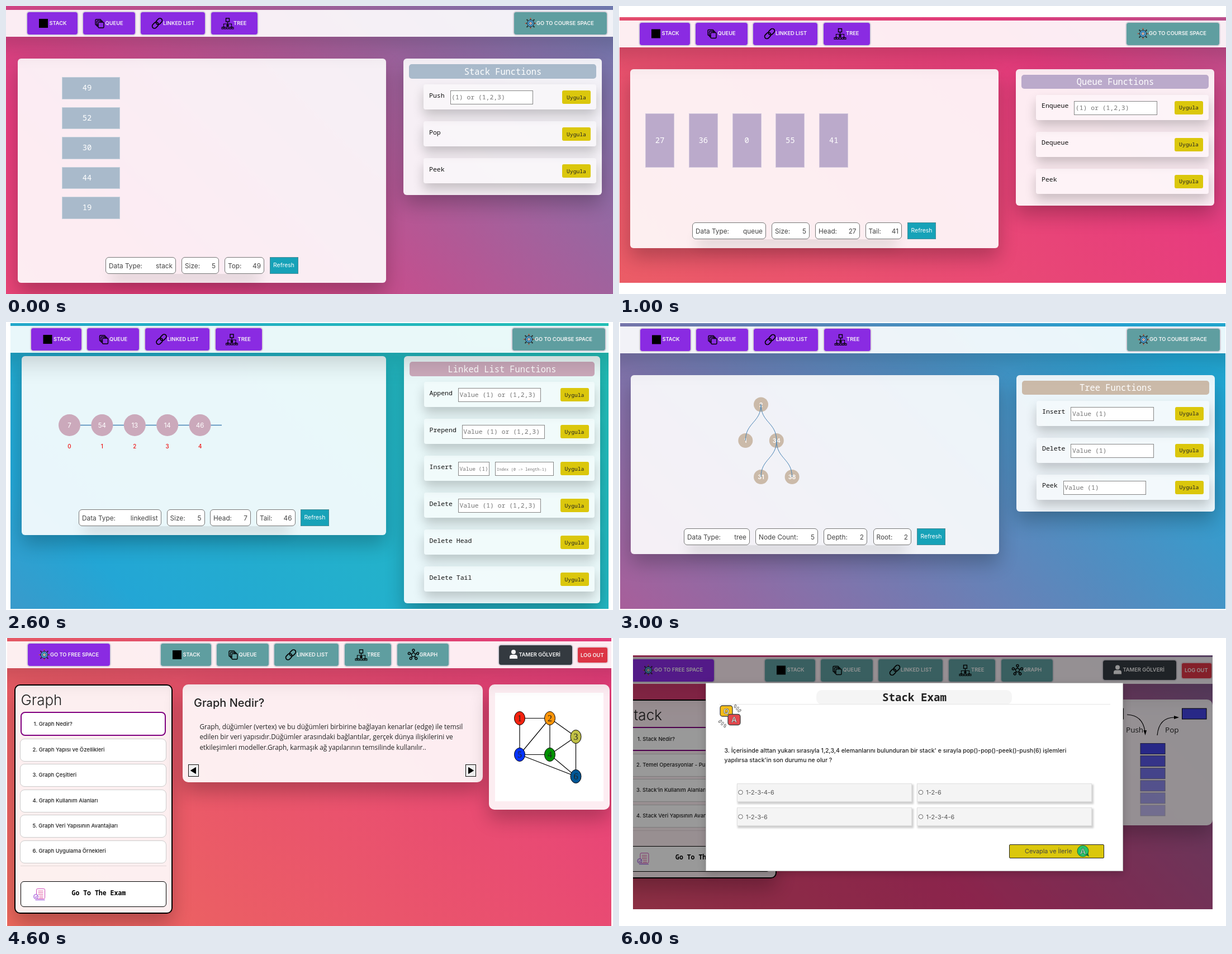
These frames come from a looping animation (1086 by 515 pixels, 7 s). An HTML page:

```html
<!DOCTYPE html>
<html lang="tr">
<head>
<meta charset="utf-8">
<title>Data structures tour</title>
<style>
html, body { margin: 0; width: 100%; height: 100%; overflow: hidden; background: #fff; }
#stage { position: relative; width: 1086px; height: 515px; overflow: hidden; }
.scene { position: absolute; inset: 0; visibility: hidden; }
.scene div { position: absolute; box-sizing: border-box; }
.page { overflow: hidden; }
svg { position: absolute; left: 0; top: 0; width: 1086px; height: 515px; overflow: visible; fill: #222; font-family: Inter, sans-serif; }
text { white-space: pre; }
.m { font-family: 'Noto Sans Mono', monospace; }
.o { font-family: 'Open Sans', sans-serif; }
.s { font-family: 'Liberation Serif', serif; }
.c { text-anchor: middle; }
.e { text-anchor: end; }
.b { font-weight: 600; }
.n { font-weight: 500; }
.l { font-weight: 300; }
</style>
</head>
<body>
<div id="stage"></div>
<script>
const VIOLET = '#8a2be2', TEAL = '#5f9ea0', YELLOW = '#dbc70c', GLASS = 'rgba(255,255,255,.9)';
const SHADOW = 'box-shadow:0 17px 34px rgba(0,0,0,.24);';
const NAV_SHADOW = 'box-shadow:0 17px 40px rgba(0,0,0,.17);';
const ROW_SHADOW = 'box-shadow:0 11px 20px rgba(0,0,0,.2);';

const round = r => `border-radius:${r}px;`;
const edge = (w, color) => `border:${w}px solid ${color};`;
const svg = s => `<svg>${s}</svg>`;
const each = (list, fn) => list.map(fn).join('');
const box = (x, y, w, h, fill, css = '') =>
  `<div style="left:${x}px;top:${y}px;width:${w}px;height:${h}px;background:${fill};${css}"></div>`;
const text = (x, y, s, size, cls = '', fill = '#222', more = '') =>
  svg(`<text x="${x}" y="${y}" font-size="${size}" class="${cls}" fill="${fill}" ${more}>${s}</text>`);
const path = (d, stroke = '#000', w = 1, fill = 'none') =>
  `<path d="${d}" stroke="${stroke}" stroke-width="${w}" fill="${fill}"/>`;
const rect = (x, y, w, h, fill, more = '') =>
  `<rect x="${x}" y="${y}" width="${w}" height="${h}" fill="${fill}" ${more}/>`;
const dot = (x, y, r, fill, more = '') => `<circle cx="${x}" cy="${y}" r="${r}" fill="${fill}" ${more}/>`;
const at = (x, y, s, more = '') => svg(`<g transform="translate(${x} ${y}) ${more}">${s}</g>`);

const page = (x, y, w, h, drift, body) =>
  `<div class="page" style="left:${x}px;top:${y}px;width:${w}px;height:${h}px;` +
  `background:linear-gradient(45deg,#ee7752,#e73c7e,#23a6d5,#23d5ab) ${drift}/400% 400%">` +
  `<div style="left:${-x}px;top:${-y}px">${body}</div></div>`;

// Icons, drawn around 0,0
const spokes = (n, fn) => each([...Array(n).keys()], i => `<g transform="rotate(${i * 360 / n})">${fn(i)}</g>`);
const outline = 'stroke="#000" stroke-width="1.4"';
const icons = {
  stack: rect(-8, -8, 16, 16, '#000'),
  queue: each([-7, -4.5, -2], p => rect(p, p, 10, 10, p < -2 ? 'none' : 'var(--tone)', outline + ' rx="1.5"')),
  link: `<g transform="rotate(-45)">${each([-11, -1.5], x => rect(x, -4, 12.5, 8, 'none', 'rx="4" stroke="#000" stroke-width="1.7"'))}</g>`,
  tree: rect(-3, -9, 6, 6, 'none', outline) + path('M0 -3V1M-7 4V1H7V4M0 1V4M-9 8L-7 5L-5 8M5 8L7 5L9 8', '#000', 1.2) +
    each([-9, -4.5, 0, 4.5, 9], x => rect(x - 1.5, 7, 3, 3, 'none', 'stroke="#000"')) + rect(-2, 2, 4, 4, '#000'),
  graph: dot(0, 0, 3.4, 'none', outline) + spokes(5, () => path('M0 -3.4V-6', '#000', 1.3) + dot(0, -8, 2, 'none', outline)),
  core: spokes(8, i => path('M0 -5V-8.5', '#222', 1.2) + dot(0, -8.8, 1.1, i % 2 ? '#222' : '#c4563c')) +
    dot(0, 0, 6, '#4aa5dc', 'stroke="#222"') + dot(0, 0, 3, '#bfe4f5', 'stroke="#234"') + dot(0, 0, 1.2, '#d8643c'),
  user: dot(0, -4, 4, '#f5f5f5') + path('M-7 8V5Q-7 1 -3 1H3Q7 1 7 5V8Z', 'none', 0, '#f5f5f5'),
  exam: rect(-5, -10, 15, 18, 'none', 'rx="2" stroke="#cf45b4"') + path('M-2 -6H7M-2 -3H7M-2 0H7M0 3H7M0 6H7', '#e0559c') +
    dot(-6, 4, 4, '#fbe9f8', 'stroke="#9148d8"') + path('M-8 4L-6 6L-3 2M-7 10H10', '#9148d8')
};

const star = (x, y, r) => {
  const pts = [...Array(10).keys()].map(i => {
    const a = i * Math.PI / 5 - 1.35, q = i % 2 ? r * .52 : r;
    return `${(q * Math.cos(a)).toFixed(1)} ${(q * Math.sin(a)).toFixed(1)}`;
  });
  return at(x, y, `<polygon points="${pts}" fill="#000" stroke="#000" stroke-linejoin="round"/>`);
};

// Navigation bar
const label = (x, y, s) => text(x, y + 26.6, s, 9.3, 'b', '#f5f5f5');
const navButton = (x, y, w, icon, name, color) =>
  box(x, y + 2, w, 44, color, round(6) + edge(2, '#d8d3dc')) +
  `<span style="--tone:${color}">${at(x + 31.5, y + 24, icons[icon])}</span>` + label(x + 42, y, name);
const bar = y => box(-30, y, 1146, 48, GLASS, NAV_SHADOW);
const links = [[0, 94, 'stack', 'STACK'], [100, 97, 'queue', 'QUEUE'], [203.5, 119, 'link', 'LINKED LIST'],
  [329.5, 87, 'tree', 'TREE'], [423, 96, 'graph', 'GRAPH']];

const freeNav = (dx, y, courseX) => bar(y) +
  each(links.slice(0, 4), ([x, w, icon, name]) => navButton(x + 35.5 + dx, y, w, icon, name, VIOLET)) +
  navButton(courseX, y, 170, 'core', 'GO TO COURSE SPACE', TEAL);

const courseNav = (dx, y, hover) => bar(y) +
  navButton(38 + dx, y, 151, 'core', 'GO TO FREE SPACE', VIOLET).replace(/^<div.*?<\/div>/, d => hover
    ? box(39, y + 4, 144, 40, '#ea6650', round(4) + edge(4, VIOLET) + 'box-shadow:inset 0 -3px 3px #a33c32;') : d) +
  each(links, ([x, w, icon, name]) => navButton(x + 275.5 + dx, y, w, icon, name, TEAL)) +
  box(880.5 + dx, y + 4.5, 135, 39, '#343a40', round(6) + edge(2, '#d8d3dc')) +
  at(909 + dx, y + 23, icons.user) + label(918.5 + dx, y, 'TAMER GÖLVERİ') +
  box(1022 + dx, y + 9, 57, 31, '#dc3545', round(5) + edge(2, '#e8d3dc')) + label(1029 + dx, y + 1, 'LOG OUT');

// Free space widgets
const glass = (x, y, w, h, r = 6, css = '') => box(x, y, w, h, GLASS, round(r) + SHADOW + css);

const status = (y, pills, refreshX) =>
  box(pills[0][0], y, refreshX - pills[0][0] - 10, 30, 'none', 'box-shadow:0 19px 24px -9px rgba(0,0,0,.2);') +
  each(pills, ([x, w, name, value]) => box(x, y, w, 30, '#fff', round(6) + edge(1, '#777')) +
    text(x + 6, y + 19.5, name + ':', 11.8, '', '#444') + text(x + w - 6, y + 19.5, value, 11.8, 'e', '#444')) +
  box(refreshX, y, 51, 30, '#17a2b8', 'border:1px dotted #777;') + text(refreshX + 25.5, y + 18, 'Refresh', 10.4, 'c', '#fff');

const field = (x, y, w, hint, size) =>
  box(x, y, w, 25, '#fff', edge(1, '#858585')) + text(x + 2.5, y + 16, hint, size, 'm', '#757575');

const functions = (x, y, w, h, title, color, rows) => glass(x, y, w, h) +
  box(x + 10, y + 10, w - 20, 25.5, color, round(5)) + text(x + w / 2 + .5, y + 28.5, title, 15.4, 'm c', '#fff') +
  each(rows, ([name, ...fields], i) => {
    const top = y + 46 + i * 66;
    let fx = x + 56 + name.length * 6.9;
    return box(x + 36, top, w - 46, 45, 'rgba(255,255,255,.35)', round(4) + ROW_SHADOW) +
      text(x + 46, top + 23.5, name, 11.5, 'm', '#111') +
      each(fields, ([hint, width = 148.5, size = 11.4]) => {
        const s = field(fx, top + 11, width, hint, size);
        fx += width + 10;
        return s;
      }) +
      box(x + w - 71, top + 11, 51, 24, YELLOW, round(3)) + text(x + w - 45.5, top + 26.5, 'Uygula', 9.7, 'm c');
  });

const block = (x, y, w, h, color, value, tx) =>
  box(x, y, w, h, color, edge(1, 'rgba(255,255,255,.35)')) + text(tx, y + h / 2 + 4.5, value, 13.8, 'm c', '#fff');

const LIST = '(1) or (1,2,3)', VALUES = 'Value ' + LIST, VALUE = 'Value (1)';

const stackScene = page(0, 0, 1086, 515, '32% 50%',
  glass(21, 94, 659, 401) +
  each([49, 52, 30, 44, 19], (v, i) => block(99.5, 127 + i * 53.5, 104, 39.5, '#a9bacb', v, 145)) +
  status(449, [[178, 126, 'Data Type', 'stack'], [314, 67, 'Size', 5], [391, 71, 'Top', 49]], 471.5) +
  functions(711, 94, 355, 244, 'Stack Functions', '#a9bacb', [['Push', [LIST]], ['Pop'], ['Peek']]) +
  freeNav(0, 7, 907));

const queueScene = page(1, 20, 1084.5, 475, '7% 50%',
  glass(20, 112.5, 659, 320.5) +
  each([27, 36, 0, 55, 41], (v, i) => block(47 + i * 77.8, 191.5, 52, 97.5, '#bbaacb', v, 73 + i * 77.8)) +
  status(387, [[131, 132, 'Data Type', 'queue'], [273, 68, 'Size', 5], [351, 79.5, 'Head', 27], [440.5, 65.5, 'Tail', 41]], 516) +
  functions(710, 112.5, 355, 244, 'Queue Functions', '#bbaacb', [['Enqueue', [LIST]], ['Dequeue'], ['Peek']]) +
  freeNav(-1, 25.5, 906));

const linkedScene = page(8, 2, 1070, 511, '100% 50%',
  glass(28, 61, 652, 320) +
  svg(path('M113.5 184.5H386', 'steelblue', 1.5)) +
  each([7, 54, 13, 14, 46], (v, i) => {
    const x = 113.5 + i * 58.4;
    return svg(dot(x, 184.5, 19.5, '#cba9bb')) + text(x, 188.7, v, 11.5, 'c', '#fff') + text(x, 226, i, 9.8, 'c n', '#e11');
  }) +
  status(335, [[130, 147.5, 'Data Type', 'linkedlist'], [287.5, 68, 'Size', 5], [365, 73, 'Head', 7], [448, 69.5, 'Tail', 46]], 527) +
  functions(711.5, 61, 351, 441.5, 'Linked List Functions', '#cba9bb', [['Append', [VALUES]], ['Prepend', [VALUES]],
    ['Insert', [VALUE, 56.5, 9.5], ['Index (0 -> length-1)', 104.5, 7.1]], ['Delete', [VALUES]], ['Delete Head'], ['Delete Tail']]) +
  freeNav(7.5, 7, 904));

const nodes = [[254, 147.5, 2], [226.3, 212, 1], [281.8, 212, 34], [254, 277, 31], [309.6, 277, 38]];
const branch = ([a, b]) => {
  const [x1, y1] = nodes[a], [x2, y2] = nodes[b], mid = (y1 + y2) / 2;
  return path(`M${x1} ${y1}C${x1} ${mid} ${x2} ${mid} ${x2} ${y2}`, 'steelblue');
};
const treeScene = page(2, 2, 1083, 511, '63% 50%',
  glass(21, 94.5, 659, 320.5) +
  each(nodes, ([x, y, v]) => svg(dot(x, y, 13, '#cbbaa9')) + text(x, y + 4, v, 10.8, 'c b', '#fff')) +
  svg(each([[0, 1], [0, 2], [2, 3], [2, 4]], branch)) +
  status(369, [[116, 118, 'Data Type', 'tree'], [244, 112, 'Node Count', 5], [366, 78, 'Depth', 2], [454.5, 68.5, 'Root', 2]], 533) +
  functions(711, 94.5, 354.5, 244, 'Tree Functions', '#cbbaa9', [['Insert', [VALUE]], ['Delete', [VALUE]], ['Peek', [VALUE]]]) +
  freeNav(0, 7.5, 907));

// Course space widgets
const topics = (dx, dy, title, items) => {
  const end = dy + 135 + items.length * 45.4;
  return glass(15 + dx, 82.5 + dy, 283.5, end + 86 - 82.5 - dy, 10, edge(2, '#000')) +
    text(27 + dx, 119.5 + dy, title, 26, 'l') +
    each(items, (name, i) => {
      const y = 134 + dy + i * 45.4, s = `${i + 1}. ${name}`;
      return i
        ? box(25 + dx, y + .5, 262, 41, '#fff', round(8) + edge(1, '#ccc')) + text(48 + dx, y + 23.3, s, 9.5, 'n')
        : box(26 + dx, 131.5 + dy, 260.5, 43, '#fff', round(8) + edge(2.5, 'purple')) + text(50 + dx, 156.5 + dy, s, 9.5, 'n');
    }) +
    box(26 + dx, end, 261, 1, 'rgba(0,0,0,.1)') +
    box(26 + dx, end + 28, 261, 46, '#fff', round(6) + edge(1.5, '#000')) +
    at(60 + dx, end + 51, icons.exam) + text(118 + dx, end + 52.5, 'Go To The Exam', 11.5, 'm b', '#000');
};

const vertices = [[919, 143.5, '#f5220f'], [973, 143.5, '#ff9508'], [1019.5, 176.5, '#bfbf45'],
  [973, 208.5, '#009200'], [919, 208.5, '#0433ff'], [1019.5, 247.5, '#005695']];
const edges = [[1, 2], [1, 5], [2, 5], [2, 4], [2, 3], [3, 4], [3, 6], [5, 4], [5, 6], [4, 6]];
const arrow = (x, d) => box(x, 226, 19.5, 22, '#efefef', edge(1.5, '#111')) + svg(path(d, '#000', 1, '#000'));

const graphScene = page(2, 0, 1081, 515, '0% 67%',
  topics(-.5, 0, 'Graph', ['Graph Nedir?', 'Graph Yapısı ve Özellikleri', 'Graph Çeşitleri', 'Graph Kullanım Alanları',
    'Graph Veri Yapısının Avantajları', 'Graph Uygulama Örnekleri']) +
  glass(315.5, 82.5, 537, 175, 10) + text(336, 123, 'Graph Nedir?', 20, 'n') +
  each(['Graph, düğümler (vertex) ve bu düğümleri birbirine bağlayan kenarlar (edge) ile temsil',
    'edilen bir veri yapısıdır.Düğümler arasındaki bağlantılar, gerçek dünya ilişkilerini ve',
    'etkileşimleri modeller.Graph, karmaşık ağ yapılarının temsilinde kullanılır..'],
    (s, i) => text(346.5, 162.5 + i * 18.7, s, 11.8, 'o')) +
  arrow(325.5, 'M339.5 231.5V242.5L330.5 237Z') + arrow(821.5, 'M827.5 231.5V242.5L836.5 237Z') +
  glass(863.5, 82.5, 216, 224.5, 10) + box(874.5, 98, 194, 194, '#fff') +
  svg(each(edges, ([a, b]) => {
    const [x1, y1] = vertices[a - 1], [x2, y2] = vertices[b - 1];
    return path(`M${x1} ${y1}L${x2} ${y2}`, '#000', 1.2);
  }) + each(vertices, ([x, y, fill], i) => `<ellipse cx="${x}" cy="${y}" rx="9.5" ry="12" fill="${fill}" stroke="#000"/>` +
    `<text x="${x}" y="${y + 5.5}" font-size="16" class="s c">${i + 1}</text>`)) +
  courseNav(-1, 6));

const avatar = dot(0, 0, 29.5, '#5fc8fb') +
  path('M-18 18Q-24 -8 -17 -24Q-8 -39 7 -35Q20 -31 18 -8Q22 8 19 19Q0 30 -18 18Z', 'none', 0, '#f69297') +
  path('M-22 20Q-10 13 0 13Q12 13 22 20Q12 30 0 29.5Q-13 30 -22 20Z', 'none', 0, '#ff4b92') +
  path('M-6 8H6V16Q0 23 -6 16Z', 'none', 0, '#8d4b2c') +
  path('M-13 -14Q-4 -17 2 -24Q6 -16 13 -14V-2Q12 14 0 15Q-12 14 -13 -2Z', 'none', 0, '#a95f36') +
  each([-7, 7], x => dot(x, -11, 6, 'none', 'stroke="#222" stroke-width="1.5"') + dot(x, -11, 1.6, '#222')) +
  path('M-1 -11H1M-3 -1Q0 1 3 -1', '#5a2d19', 1.3) + path('M-6 3H6Q4 10 0 10Q-5 10 -6 3Z', 'none', 0, '#fff') +
  path('M-8 18V28M9 18V28', '#fff', 1.3);

const stat = (x, w, name, value, shift = 0) =>
  each([344, 368], y => box(x, y - .5, w, 25, 'none', edge(2, '#000'))) +
  text(x + w / 2, 360, name, 10.1, 'c', '#555') + text(x + w / 2 + shift, 384, value, 10.1, 'c', '#555');

const resultScene = page(1, 71, 1084, 373, '100% 50%',
  glass(61, 153, 640, 173.5, 8, edge(2, '#000')) + text(83.5, 200.5, 'Sonuçlar', 27, 'l') +
  box(84, 213, 594, 1, 'rgba(0,0,0,.1)') +
  each(['Queue', 'Stack'], (s, i) => box(82, 218.5 + i * 45.5, 598, 41, '#fff', round(8) + edge(1, '#ccc')) +
    text(104, 241.5 + i * 45.3, s, 9.6, 'm b', '#000')) +
  star(624, 284, 8.5) + star(646, 284, 8.5) +
  courseNav(-2.5, 76, true) +
  box(792, 153, 213, 251, GLASS, round(8) + edge(1, '#666') + 'box-shadow:0 0 9px 5px #fff,0 0 18px 12px #b04fbd;') +
  at(898, 204, avatar) + text(898, 278, 'Tamer Gölveri', 15.2, 'c n') +
  text(898.5, 301, 'tamergolveri@example.com', 9.7, 'c', '#444', 'font-style="italic"') +
  box(832, 305.5, 133, 1, 'rgba(0,0,0,.1)') +
  stat(803, 53, 'Ortalama', 1, 9) + star(827, 379.5, 8) +
  stat(866, 70, 'Bitirilen Kurs', '2/5', 4) + svg(rect(890, 376, 7, 8, '#333')) +
  stat(946, 47, '5 Yıldızlı', 0));

const bubble = (x, y, color, ch) => svg(rect(x, y, 22, 19, color, 'rx="4" stroke="#444" stroke-width="1.3"')) +
  text(x + 11, y + 14.5, ch, 13.5, 'c b', '#fff', 'stroke="#444" stroke-width=".6"');
const dash = (x, y, a) => at(x, y, rect(-1.3, -3, 2.6, 6, '#fff', 'rx="1.3" stroke="#555" stroke-width=".9"'), `rotate(${a})`);
const option = (x, y, s) =>
  box(x, y, 313, 33, '#f4f4f4', edge(1.5, '#e0e0e0') + 'box-shadow:2px 3px 3px 1px #cfcfcf;') +
  svg(dot(x + 7, y + 16.5, 3.8, '#fff', 'stroke="#666"')) + text(x + 16.5, y + 20.5, s, 10.8, '', '#555');

const examScene = page(25, 30.5, 1036.5, 454, '22% 50%',
  topics(-17, 27, 'Stack', ['Stack Nedir?', 'Temel Operasyonlar - Push, Pop', 'Stack’in Kullanım Alanları', 'Stack Veri Yapısının Avantajları']) +
  glass(847, 110, 215, 225, 10) +
  svg(rect(859, 126, 43.5, 19, '#4343e0', 'stroke="#000"') + rect(1007.5, 126, 43.5, 19, '#4343e0', 'stroke="#000"') +
    each([1, .88, .74, .6, .45, .32], (a, i) => rect(933, 188.5 + i * 22.1, 44, 19, '#4343e0', `opacity="${a}" stroke="#336"`)) +
    path('M909 137Q937 138 941 167M963 174Q966 142 994 142', '#000', 1.2) +
    path('M938.5 165L944 165L941.5 174ZM993 139V145L1002 142Z', 'none', 0, '#000')) +
  text(907, 169, 'Push', 13.5, 'o') + text(977, 169, 'Pop', 13.5, 'o') +
  courseNav(-17, 33.5) +
  box(0, 0, 1086, 515, 'rgba(0,0,0,.4)') +
  box(155, 80, 747, 337, '#fff', edge(1, '#bbb') + 'box-shadow:0 4px 14px rgba(0,0,0,.2);') +
  box(353, 93, 350, 25.5, '#f5f5f5', round(10)) + text(528.5, 112.5, 'Stack Exam', 19.2, 'm b c') +
  box(179, 118, 700, 1, '#e6e6e6') +
  bubble(181, 121, '#f5bd17', 'Q') + bubble(195, 136.5, '#e5484d', 'A') +
  each([[208, 122, 15], [212, 126, 35], [215.5, 130, 60], [181, 149, 60], [185, 153, 35], [189.5, 157, 15]], d => dash(...d)) +
  text(188.5, 204.5, "3. İçerisinde alttan yukarı sırasıyla 1,2,3,4 elemanlarını bulunduran bir stack' e sırayla pop()-pop()-peek()-push(6) işlemleri", 10.5, 'n') +
  text(188.5, 221.5, "yapılırsa stack'in son durumu ne olur ?", 10.5, 'n') +
  option(210.5, 259.5, '1-2-3-4-6') + option(533, 259.5, '1-2-6') +
  option(210.5, 303, '1-2-3-6') + option(533, 303, '1-2-3-4-6') +
  box(698, 369, 170, 25, YELLOW, round(2) + edge(1.5, '#222')) + text(726, 384.5, 'Cevapla ve İlerle', 10.8, '', '#444') +
  svg(dot(830, 381, 10, '#27c46b', 'stroke="#176b3d"') + path('M835 388L841 391L839 384Z', 'none', 0, '#176b3d')) +
  text(830, 386.5, 'A', 15, 'c b', '#fff', 'stroke="#176b3d" stroke-width=".8"'));

const SCENES = [stackScene, queueScene, linkedScene, treeScene, graphScene, resultScene, examScene];
const HOLD = 1000;
const stage = document.getElementById('stage');
stage.innerHTML = each(SCENES, s => `<div class="scene">${s}</div>`);

function show() {
  const current = Math.floor(performance.now() / HOLD) % SCENES.length;
  [...stage.children].forEach((el, i) => { el.style.visibility = i === current ? 'visible' : 'hidden'; });
  requestAnimationFrame(show);
}
show();
</script>
</body>
</html>
```
